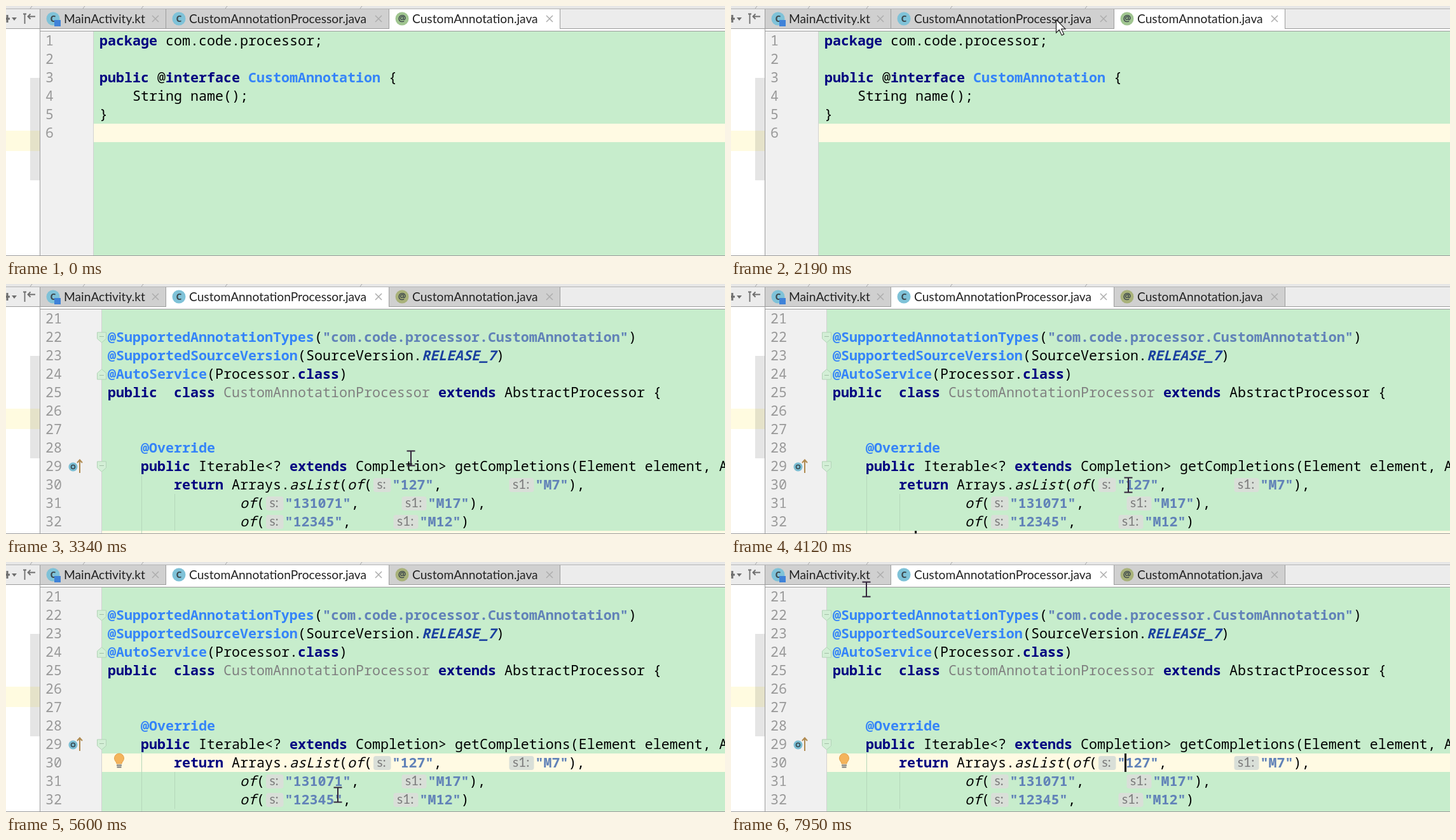
Animation, 1131 px wide and 393 px high, one loop 8000 ms. Source, as an HTML page:

```html
<!DOCTYPE html>
<html lang="en">
<head>
<meta charset="utf-8">
<title>Annotation editor</title>
<style>
html, body { margin: 0; width: 100%; height: 100%; overflow: hidden; background: #fff; }
svg { display: block; width: 1131px; height: 393px; }
text { white-space: pre; }
.code { font: 21.667px "Noto Sans Mono", monospace; fill: #000; }
.ui { font: 19.2px Lato, "Open Sans", sans-serif; fill: #222; }
.num { fill: #999; }
.key { fill: #000080; font-weight: 700; }
.ann { fill: #3584f8; font-weight: 700; }
.str { fill: #6182b8; font-weight: 700; }
.const { fill: #1a409f; font-weight: 700; font-style: italic; }
.call { font-style: italic; }
.dim { fill: #808080; }
.hint { font-size: 21px; fill: #7d7d7d; }
.badge { font: 700 14px "Open Sans", sans-serif; fill: #3d474c; text-anchor: middle; }
</style>
</head>
<body>
<script>
const NS = 'http://www.w3.org/2000/svg';
const GREEN = '#c7edcc', YELLOW = '#fffae3', EDGE = '#9c9c9c';
const CHAR = 13, ROW = 29, TOP = 40, LOOP = 8000;

function add(parent, tag, attrs = {}, content) {
  const node = document.createElementNS(NS, tag);
  for (const name in attrs) node.setAttribute(name, attrs[name]);
  if (content !== undefined) node.textContent = content;
  parent.append(node);
  return node;
}
const rect = (p, x, y, width, height, fill, rx = 0) =>
  add(p, 'rect', { x, y, width, height, fill, rx });
const path = (p, d, stroke, width = 1, fill = 'none') =>
  add(p, 'path', { d, stroke, 'stroke-width': width, fill });
const disc = (p, cx, cy, r, fill) => add(p, 'circle', { cx, cy, r, fill });
const label = (p, x, y, cls, s) => add(p, 'text', { x, y, class: cls }, s);
const show = (node, on) => node.setAttribute('visibility', on ? 'inherit' : 'hidden');
const rowY = row => TOP + row * ROW;

const svg = add(document.body, 'svg', { viewBox: '0 0 1131 393' });

// Tokens come in pairs: class, text. "hint" draws an inlay parameter name.
function line(p, row, x, ...tokens) {
  const y = rowY(row);
  for (let i = 0; i < tokens.length; i += 2) {
    const [cls, s] = [tokens[i], tokens[i + 1]];
    if (cls === 'hint') {
      const w = s.length > 2 ? 43 : 31.5;
      rect(p, x + 2, y + 4, w - 4, 22, '#d9dfd8', 4);
      label(p, x + 7.5, y + 21, 'ui hint', s);
      x += w;
    } else {
      label(p, x, y + 22, 'code ' + cls, s);
      x += s.length * CHAR;
    }
  }
}

function gutter(p, width, first, count) {
  rect(p, 54, TOP, width, 353, '#f0f0f0');
  rect(p, 54 + width - 1, TOP, 1, 353, '#d2d2d2');
  for (let i = 0; i < count; i++) label(p, 62, rowY(i) + 22, 'code num', first + i);
}

function frame() {
  rect(svg, 0, 0, 1131, 5, '#e6e6e6');
  for (const x of [38, 121, 213, 345, 557]) path(svg, `M${x} 4l3-4`, '#a8a8a8');
  rect(svg, 0, 5, 1131, 31, '#ececec');
  rect(svg, 0, 4, 1131, 1, '#b4b4b4');
  rect(svg, 0, 36, 53, 357, '#fff');
  rect(svg, 0, 35, 53, 1, EDGE);
  rect(svg, 0, 196, 53, 32, '#fffbe0');
  rect(svg, 38, 113, 15, 161, '#000').setAttribute('fill-opacity', .1);
  path(svg, 'M0 20H6M2 14V26', '#6e6e6e', 3);
  path(svg, 'M9 18h8l-4 5z', 'none', 0, '#6e6e6e');
  path(svg, 'M29.5 12V28M27 12.5h5M34 16.5H46M38.500 12.500l-4 4 4 4', '#6e6e6e', 1.8);
}

const TABS = [
  { x: 54, w: 197, icon: 74, text: 91, close: 235, name: 'MainActivity.kt' },
  { x: 252, w: 350, icon: 272, text: 288, close: 586, name: 'CustomAnnotationProcessor.java' },
  { x: 603, w: 268, icon: 623, text: 639, close: 855, name: 'CustomAnnotation.java' }
];

function tabBar(p, active) {
  rect(p, 54, 36, 1077, 3, '#fff');
  rect(p, 54, 35, 1077, 1, EDGE);
  TABS.forEach((t, i) => {
    const on = i === active;
    rect(p, t.x, 5, t.w, on ? 33 : 30, on ? '#fff' : '#d0d0d0');
    rect(p, t.x + t.w, 5, 1, 31, EDGE);
    const at = i === 2;
    disc(p, t.icon, 20, 10.5, at ? (on ? '#a0c590' : '#a9b27a') : '#7fc2d8');
    label(p, t.icon, at ? 24 : 25, 'badge', at ? '@' : 'C');
    if (i === 0) rect(p, 76, 22, 10, 10, '#3f82d8');
    label(p, t.text, 27, 'ui', t.name);
    path(p, `M${t.close - 5} 15l10 10m0-10l-10 10`, '#adadad', 1.5);
  });
  rect(p, 54, 39, 1077, 1, EDGE);
}

function annotationView() {
  const p = add(svg, 'g');
  rect(p, 54, TOP, 1077, 353, GREEN);
  rect(p, 54, rowY(5), 1077, ROW, YELLOW);
  gutter(p, 84, 1, 6);
  tabBar(p, 2);
  line(p, 0, 147, 'key', 'package', '', ' com.code.processor;');
  line(p, 2, 147, 'key', 'public', '', ' @', 'key', 'interface', '', ' ', 'ann', 'CustomAnnotation', '', ' {');
  line(p, 3, 147, '', '    String name();');
  line(p, 4, 147, '', '}');
  return p;
}

function fold(p, row, dir) {
  const y = rowY(row) + 15;
  path(p, `M143.500 ${y - 8 * dir}h14v${10 * dir}l-7 ${6 * dir}-7-${6}z`.replace('-7-6', `-7 ${-6 * dir}`),
    '#b3d3b8', 1, '#d3efd6');
  path(p, `M147 ${y - 1.5 * dir}h7`, '#a3bfa7');
}

function processorView() {
  const p = add(svg, 'g');
  rect(p, 54, TOP, 1077, 353, GREEN);
  const current = rect(p, 54, 0, 1077, ROW, YELLOW);
  gutter(p, 97, 21, 12);
  tabBar(p, 1);
  path(p, 'M213.500 301V393M265.500 330V388', '#b5d7ba');
  fold(p, 1, 1);
  fold(p, 3, -1);
  fold(p, 8, 1);
  disc(p, 105.5, 287.5, 7, '#7bbdd2');
  add(p, 'circle', { cx: 105.5, cy: 287.5, r: 3, fill: 'none', stroke: '#37474f', 'stroke-width': 1.6 });
  path(p, 'M116 297V277M112 281l4-4.500 4 4.500', '#b08a50', 2);

  line(p, 1, 160, 'ann', '@SupportedAnnotationTypes', '', '(', 'str', '"com.code.processor.CustomAnnotation"', '', ')');
  line(p, 2, 160, 'ann', '@SupportedSourceVersion', '', '(SourceVersion.', 'const', 'RELEASE_7', '', ')');
  line(p, 3, 160, 'ann', '@AutoService', '', '(Processor.', 'key', 'class', '', ')');
  line(p, 4, 160, 'key', 'public  class', '', ' ', 'dim', 'CustomAnnotationProcessor', '', ' ',
    'key', 'extends', '', ' AbstractProcessor {');
  line(p, 7, 212, 'ann', '@Override');
  line(p, 8, 212, 'key', 'public', '', ' Iterable<? ', 'key', 'extends',
    '', ' Completion> getCompletions(Element element, A');
  line(p, 9, 264, 'key', 'return', '', ' Arrays.', 'call', 'asList', '', '(', 'call', 'of', '', '(',
    'hint', 's:', 'str', '"127"', '', ',        ', 'hint', 's1:', 'str', '"M7"', '', '),');
  line(p, 10, 368, 'call', 'of', '', '(', 'hint', 's:', 'str', '"131071"', '', ',     ',
    'hint', 's1:', 'str', '"M17"', '', '),');
  line(p, 11, 368, 'call', 'of', '', '(', 'hint', 's:', 'str', '"12345"', '', ',     ',
    'hint', 's1:', 'str', '"M12"', '', ')');

  const bulb = add(p, 'g');
  path(bulb, 'M174 317q0-2-2-4a7.500 7.500 0 1 1 12 0q-2 2-2 4z', '#e2a04a', 1, '#f4b45c');
  path(bulb, 'M174 319.500h8M174.500 322.500h7', '#777', 2);
  const caret = rect(p, 0, 0, 3, ROW, '#000');
  return { p, current, bulb, caret };
}

frame();
const first = annotationView();
const second = processorView();
rect(svg, 53, 5, 1, 388, EDGE);
rect(svg, 0, 392, 1131, 1, EDGE);

const beam = add(svg, 'g');
path(beam, 'M-6.500-11.500H6.500M0-11.500V11.500M-6.500 11.500H6.500', '#33243a', 2);
const arrow = add(svg, 'g');
path(arrow, 'M.5.5V21l4.800-4.500 4 8.500 3.400-1.600-4-8.200H15z', '#222', 1.2, '#fff');

// Pointer moves: start, end, number of steps, way points at even progress.
const MOVES = [
  [210, 390, 3, [849, 198], [781, 124]],
  [690, 1020, 5, [770, 125], [690, 129]],
  [1320, 2090, 11, [642, 100], [585, 68], [540, 46], [518, 32], [510, 25]],
  [2190, 2340, 3, [511, 21], [511, 20]],
  [2720, 2890, 3, [540, 62], [638, 264]],
  [3190, 3950, 11, [638, 268], [631, 300], [625, 316]],
  [4500, 5240, 10, [612, 322], [522, 366], [522, 366], [522, 366]],
  [5750, 6380, 9, [524, 366], [540, 360], [558, 354], [571, 351], [575, 347]],
  [6860, 6990, 3, [560, 310], [520, 203]],
  [7310, 7390, 2, [440, 140], [371, 80]],
  [7690, 7950, 4, [330, 72], [213, 43]]
];
const SWITCH = 2260, CLICK = 4200, BULB = 5100;
const HIDDEN = [[3250, 3750], [4500, 4820], [5380, 5880], [6380, 6880], [7380, 7880]];

function pointer(t) {
  const move = MOVES.filter(m => m[0] <= t).pop();
  if (!move) return null;
  const [start, end, steps, ...pts] = move;
  const done = Math.floor((t - start) / (end - start) * (steps - 1) + .01) / (steps - 1);
  const pos = Math.min(1, done) * (pts.length - 1);
  const i = Math.min(Math.floor(pos), pts.length - 2);
  return pts[i].map((v, k) => Math.round(v + (pts[i + 1][k] - v) * (pos - i)));
}

function draw(t) {
  show(first, t < SWITCH);
  show(second.p, t >= SWITCH);
  const clicked = t >= CLICK;
  const y = rowY(clicked ? 9 : 12);
  second.current.setAttribute('y', y);
  second.caret.setAttribute('x', clicked ? 619 : 289);
  second.caret.setAttribute('y', y);
  show(second.caret, !HIDDEN.some(([a, b]) => t >= a && t < b));
  show(second.bulb, t >= BULB);

  const at = pointer(t);
  const onTabs = at && at[1] < 40;
  show(arrow, onTabs);
  show(beam, at && !onTabs);
  if (at) (onTabs ? arrow : beam).setAttribute('transform', `translate(${at})`);
}

const begin = performance.now();
function tick() {
  draw((performance.now() - begin) % LOOP);
  requestAnimationFrame(tick);
}
tick();
</script>
</body>
</html>
```
